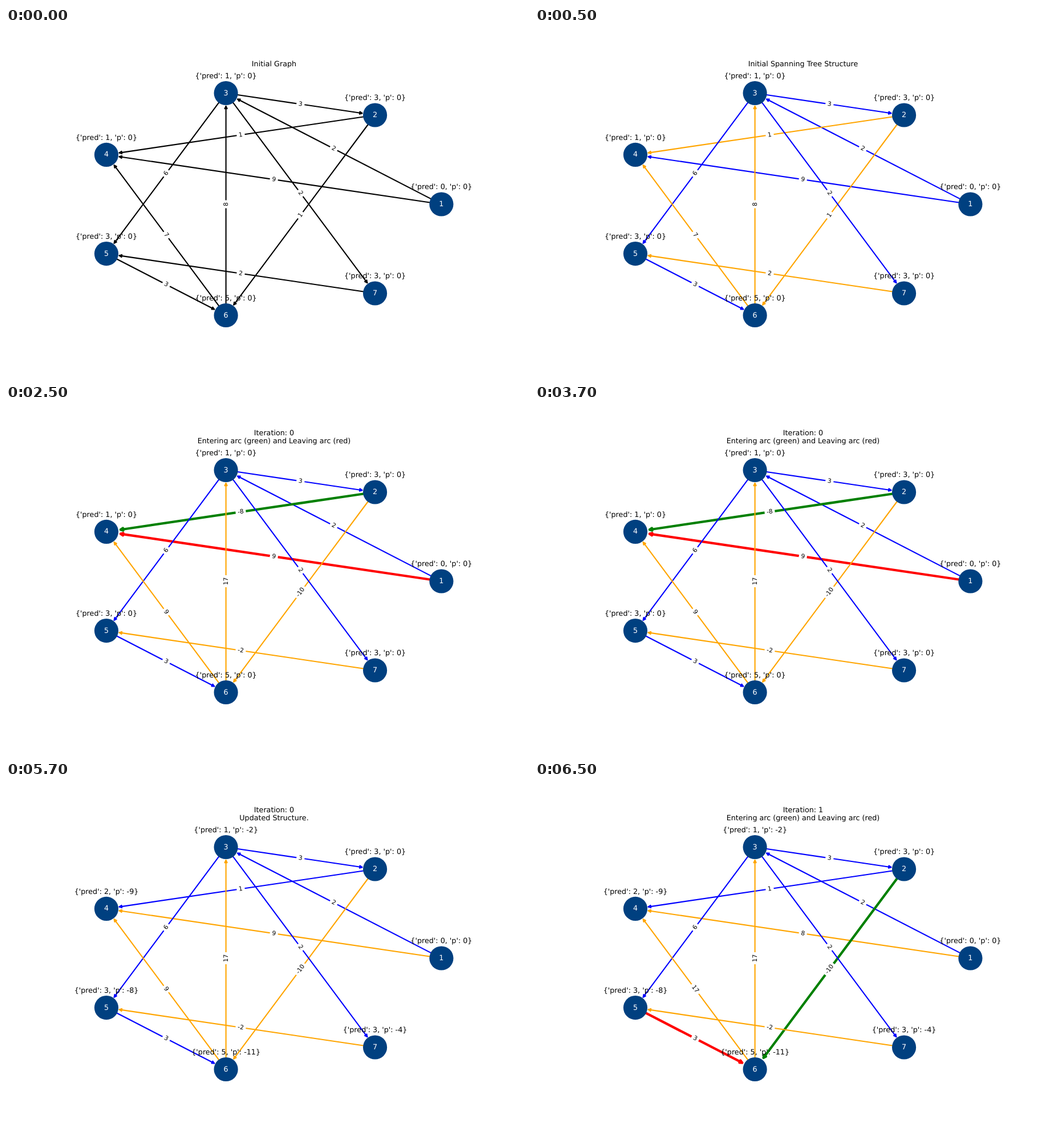
Write an HTML page that moves like this. It is 917 px wide and 611 px high and loops after 8000 ms.

```html
<!DOCTYPE html>
<html lang="en">
<head>
<meta charset="utf-8">
<title>Network simplex</title>
<style>
  html, body { margin: 0; width: 100%; height: 100%; overflow: hidden; background: #fff; }
  svg { display: block; width: 917px; height: 611px; }
  text { font-family: "DejaVu Sans", sans-serif; text-anchor: middle; text-rendering: geometricPrecision; white-space: pre; }
</style>
</head>
<body>
<svg id="stage" viewBox="0 0 917 611"></svg>
<script>
const PT = 917 / 864;              // pixels per point
const FONT = 12 * PT, SMALL = 10 * PT;
const CX = 454.4, CY = 308.5, RX = 309, RY = 199.5;
const SHRINK = Math.sqrt(1500) / 2 * PT;
const LOOP = 8000;

const COLORS = { k: '#000', b: '#00f', o: '#ffa500', g: '#008000', r: '#f00' };
const ARCS = ['13', '14', '24', '26', '32', '35', '37', '56', '63', '64', '75'];
const ARC_INFO = 'Entering arc (green) and Leaving arc (red)';
const FIRST = { pred: [0, 3, 1, 1, 3, 5, 3], p: [0, 0, 0, 0, 0, 0, 0] };
const UPDATED = { pred: [0, 3, 1, 2, 3, 5, 3], p: [0, 0, -2, -9, -8, -11, -4] };

const STEPS = [
  { at: 0, title: ['Initial Graph'], colors: 'kkkkkkkkkkk',
    costs: [2, 9, 1, 1, 3, 6, 2, 3, 8, 7, 2], tree: FIRST },
  { at: 500, title: ['Initial Spanning Tree Structure'], colors: 'bboobbbbooo',
    costs: [2, 9, 1, 1, 3, 6, 2, 3, 8, 7, 2], tree: FIRST },
  { at: 2500, title: ['Iteration: 0', ARC_INFO], colors: 'brgobbbbooo',
    costs: [2, 9, -8, -10, 3, 6, 2, 3, 17, 9, -2], tree: FIRST },
  { at: 4500, title: ['Iteration: 0', 'Updated Structure.'], colors: 'bobobbbbooo',
    costs: [2, 9, 1, -10, 3, 6, 2, 3, 17, 9, -2], tree: UPDATED },
  { at: 6500, title: ['Iteration: 1', ARC_INFO], colors: 'bobgbbbrooo',
    costs: [2, 8, 1, -10, 3, 6, 2, 3, 17, 17, -2], tree: UPDATED }
];

const nodes = Array.from({ length: 7 }, (_, i) => {
  const a = 2 * Math.PI * i / 7;
  return { x: CX + RX * Math.cos(a), y: CY - RY * Math.sin(a) };
});

const text = (s, x, y, size = FONT, fill = '#000') =>
  `<text x="${x}" y="${y}" font-size="${size}" fill="${fill}">${s}</text>`;

// Vertically centred on the full line box, descender included
const centred = (s, x, y, size, fill) => text(s, x, y + 0.276 * (size || FONT), size, fill);

const ends = arc => [...arc].map(n => nodes[n - 1]);

function arrow(arc, code) {
  const [a, b] = ends(arc);
  const width = ('gr'.includes(code) ? 4 : 2) * PT;
  const angle = Math.atan2(b.y - a.y, b.x - a.x) * 180 / Math.PI;
  const length = Math.hypot(b.x - a.x, b.y - a.y);
  const tip = length - SHRINK - width / 2 * Math.sqrt(5);
  const back = tip - 4 * PT, half = 2 * PT, color = COLORS[code];
  return `<g transform="translate(${a.x} ${a.y}) rotate(${angle})" stroke="${color}" fill="${color}"
    stroke-width="${width}" stroke-linejoin="round" stroke-linecap="round">
    <path d="M${SHRINK} 0H${tip}"/><path d="M${back} ${-half}L${tip} 0L${back} ${half}Z"/></g>`;
}

function cost(arc, value) {
  const [a, b] = ends(arc);
  let angle = Math.atan2(b.y - a.y, b.x - a.x) * 180 / Math.PI;
  if (angle >= 90) angle -= 180;
  if (angle < -90) angle += 180;
  const s = String(value);
  const em = [...s].reduce((sum, c) => sum + (c === '-' ? 0.361 : 0.636), 0);
  const w = (em + 0.6) * SMALL + PT, h = 1.568 * SMALL + PT;
  return `<g transform="translate(${(a.x + b.x) / 2} ${(a.y + b.y) / 2}) rotate(${angle})">
    <rect x="${-w / 2}" y="${-h / 2}" width="${w}" height="${h}" rx="${0.3 * SMALL}" fill="#fff"/>
    ${centred(s, 0, 0, SMALL)}</g>`;
}

function draw({ title, colors, costs, tree }) {
  const parts = [
    ...ARCS.map((arc, i) => arrow(arc, colors[i])),
    ...ARCS.map((arc, i) => cost(arc, costs[i])),
    ...nodes.map(n => `<circle cx="${n.x}" cy="${n.y}" r="${SHRINK + PT / 2}" fill="#004080"/>`),
    ...nodes.map((n, i) => centred(i + 1, n.x, n.y, FONT, '#fff')),
    ...nodes.map((n, i) =>
      centred(`{'pred': ${tree.pred[i]}, 'p': ${tree.p[i]}}`, n.x, n.y - 0.15 * RY)),
    ...title.map((line, i) => text(line, 470, 67 - (title.length - 1 - i) * 1.12 * FONT))
  ];
  document.getElementById('stage').innerHTML = parts.join('');
}

let shown;
const start = performance.now();
function tick() {
  const t = (performance.now() - start) % LOOP;
  const step = STEPS.filter(s => s.at <= t).pop();
  if (step !== shown) draw(shown = step);
  requestAnimationFrame(tick);
}
tick();
</script>
</body>
</html>
```
